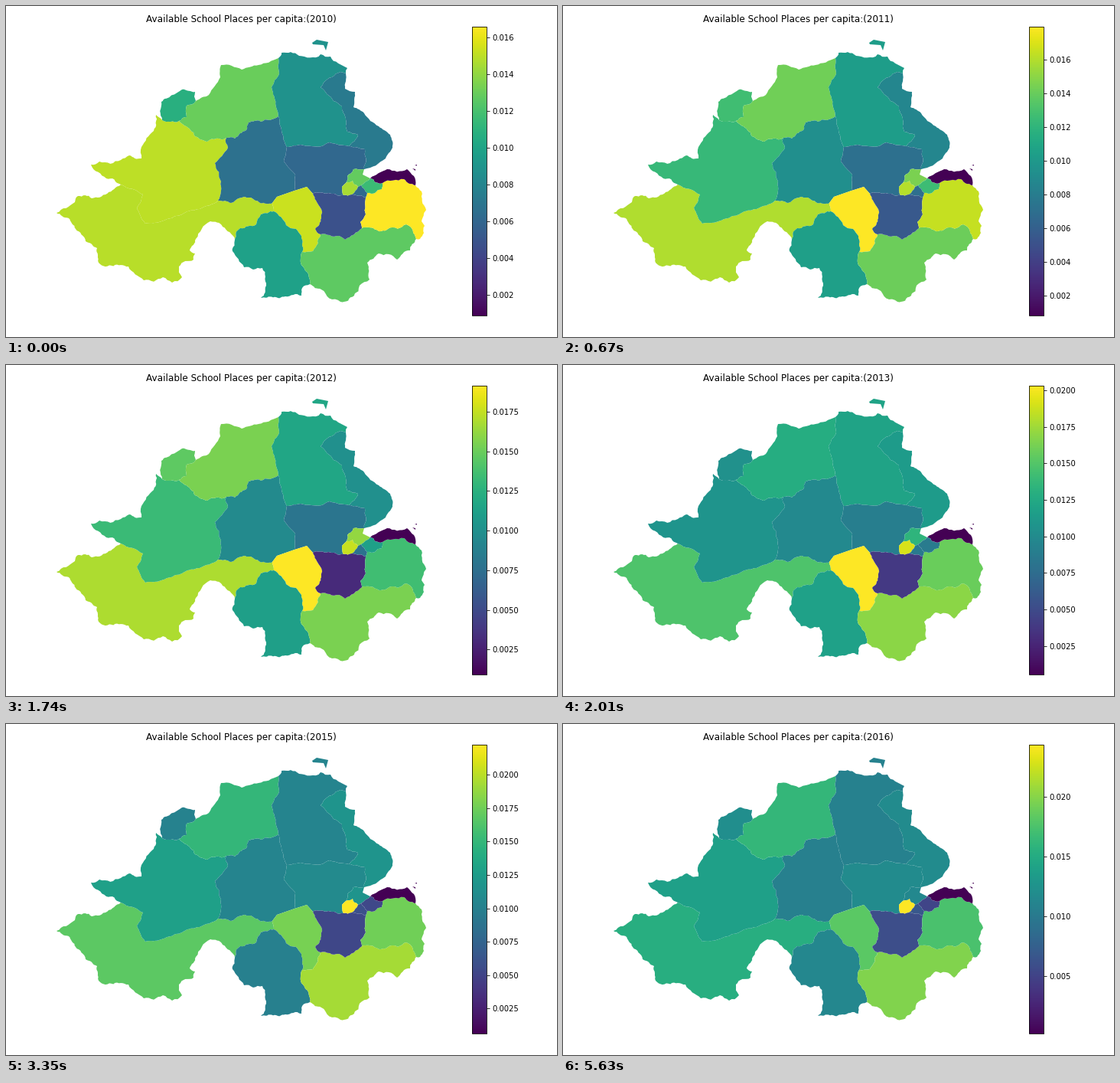
Write a matplotlib script that moves like this. It is 720 by 432 pixels and loops after 6.7 s.

```python
import numpy as np
import matplotlib.pyplot as plt
from matplotlib.animation import FuncAnimation
from matplotlib.cm import ScalarMappable
from matplotlib.colors import Normalize
from matplotlib.patches import Polygon

W, H, DPI = 720, 432, 72
FIRST_YEAR, YEARS, FRAMES = 2010, 7, 10
plt.rcParams["font.family"] = "DejaVu Sans"
rng = np.random.default_rng(4)
arcs = {}


def ragged(a, b, rough):
    """Points from a up to b, displaced at each midpoint until short."""
    dx, dy = b - a
    if np.hypot(dx, dy) < 4:
        return [a]
    mid = (a + b) / 2 + rng.uniform(-rough, rough) * np.array([-dy, dx])
    return ragged(a, mid, rough) + ragged(mid, b, rough)


def arc(name, *points, rough=0.15):
    """Border between two regions; Z is the outside."""
    keys = np.array(points, float)
    line = [p for a, b in zip(keys, keys[1:]) for p in ragged(a, b, rough)]
    arcs[name] = np.array(line + [keys[-1]])


def ring(region):
    """Chain all borders of a region into one closed outline."""
    parts = [line for name, line in arcs.items() if region in name]
    outline = parts.pop(0)
    while parts:
        tail = outline[-1]
        i = next(i for i, p in enumerate(parts)
                 if np.allclose(p[0], tail) or np.allclose(p[-1], tail))
        part = parts.pop(i)
        if np.allclose(part[-1], tail):
            part = part[::-1]
        outline = np.vstack([outline, part[1:]])
    return outline


# Outer border, clockwise
arc("EZ", (356, 68), (360, 61), (383, 65), (411, 63), (424, 66), (446, 81),
    (444, 88))
arc("FZ", (444, 88), (443, 108), (456, 112), (454, 132), (468, 140),
    (487, 157), (502, 168), (505, 185), (496, 199), (468, 213), rough=.1)
arc("OZ", (468, 213), (466, 220), (476, 225), rough=0)
arc("NZ", (476, 225), (498, 213), (524, 213), (533, 222), (535, 234))
arc("MZ", (535, 234), (543, 242), (549, 266), (543, 281), (547, 287),
    (541, 304), (536, 304))
arc("KZ", (536, 304), (528, 319), (511, 331), (487, 323), (472, 335),
    (475, 357), (455, 378), (437, 386), (412, 370), (397, 363))
arc("JZ", (397, 363), (387, 368), (386, 378), (365, 379), (333, 381),
    (340, 365), (335, 342), (311, 341), (296, 320), (299, 305))
arc("AZ", (299, 305), (283, 288), (267, 281), (248, 304), (240, 319),
    (247, 323), (245, 331), (226, 340), (230, 354), (217, 361), (205, 354),
    (180, 358), (160, 340), (121, 335), (119, 316), (104, 307), (91, 291),
    (66, 270), (90, 256), (94, 248), (112, 251), (150, 233))
arc("BZ", (150, 233), (131, 225), (111, 207), (122, 203), (150, 201),
    (161, 195), (177, 199), (177, 184), (193, 163), (196, 142), (204, 149))
arc("CZ", (204, 149), (203, 125), (230, 109), (247, 112), (248, 124))
arc("DZ", (248, 124), (265, 116), (280, 93), (281, 77), (308, 83),
    (330, 77), (356, 68), rough=.08)

# Inner borders
arc("CD", (248, 124), (236, 130), (236, 145), (226, 150))
arc("BC", (204, 149), (226, 150))
arc("BD", (226, 150), (241, 162), (247, 170), (263, 177), (288, 172))
arc("DG", (288, 172), (299, 173), (314, 162), (317, 152), (333, 151),
    (356, 144))
arc("DE", (356, 68), (357, 88), (347, 106), (356, 144), rough=.08)
arc("EG", (356, 144), (367, 184), rough=.08)
arc("BG", (277, 254), (281, 229), (273, 205), (290, 185), (288, 172))
arc("AB", (150, 233), (179, 246), (171, 263), (182, 284), (222, 274),
    (253, 265), (277, 254), rough=.08)
arc("AG", (277, 254), (294, 257), (318, 250), (348, 257))
arc("AI", (348, 257), (350, 268))
arc("AJ", (350, 268), (333, 272), (327, 285), (306, 290), (299, 305))
arc("GI", (348, 257), (354, 249), (377, 241), rough=0)
arc("GH", (367, 184), (363, 203), (378, 220), (377, 241), rough=.05)
arc("EH", (367, 184), (385, 181), (415, 182), (423, 178), (448, 183),
    rough=.08)
arc("EF", (444, 88), (437, 86), (415, 100), (411, 106), (428, 124),
    (439, 131), (444, 148), (446, 164), (460, 168), (448, 183), rough=.1)
arc("FH", (448, 183), (469, 187), (468, 213))
arc("HI", (377, 241), (393, 236), (401, 245), rough=0)
arc("HL", (401, 245), (421, 244), (441, 247))
arc("HP", (441, 247), (439, 236), (444, 231))
arc("HO", (444, 231), (446, 222), (454, 213), (468, 213))
arc("OP", (444, 231), (453, 228), (460, 236))
arc("PR", (460, 236), (452, 246))
arc("OR", (460, 236), (464, 234))
arc("OQ", (464, 234), (476, 225))
arc("QR", (464, 234), (472, 244))
arc("NQ", (476, 225), (492, 231))
arc("MQ", (472, 244), (491, 239), (492, 231))
arc("MN", (492, 231), (520, 226), (535, 234))
arc("MR", (472, 244), (470, 250))
arc("LP", (441, 247), (452, 246))
arc("LR", (452, 246), (470, 250))
arc("LM", (470, 250), (470, 272), (463, 282), (465, 290))
arc("KM", (465, 290), (499, 291), (523, 285), (536, 304))
arc("KL", (465, 290), (443, 305), (435, 300), (411, 298))
arc("IL", (401, 245), (410, 262), (412, 277), (404, 291), (411, 298))
arc("IK", (411, 298), (401, 320), (387, 321))
arc("IJ", (387, 321), (386, 300), (379, 291), (366, 286), (350, 268))
arc("JK", (387, 321), (388, 340), (397, 363))

ISLANDS = [
    ("E", [(400, 48), (406, 44), (421, 47), (418, 58), (415, 51), (401, 50)]),
    ("N", [(531, 212), (535, 213), (535, 215)]),
    ("N", [(534, 208), (537, 207), (537, 208.5)]),
]


def places(start, growth, jumps={}):
    """Places per thousand people: steady growth plus lasting jumps."""
    return [start + growth * year
            + sum(jump for when, jump in jumps.items() if when <= year)
            for year in range(YEARS)]


RATES = {
    "A": places(14.9, 1, {3: -3.1, 6: -2.4}),
    "B": places(15, 1, {1: -3.7, 3: -3.5}),
    "C": places(10.8, 1.9, {3: -6, 5: -4.2}),
    "D": places(13, 1.25, {3: -4, 4: .7, 5: -1}),
    "E": places(8.8, .3, {1: 1.2, 2: 1.1, 4: -2.2}),
    "F": places(7.3, 1.35, {5: -2.2, 6: -1.4}),
    "G": places(6.7, .27, {1: 2.3}),
    "H": places(6.1, .95),
    "I": places(15.3, 1.17, {1: 1.5, 5: -4.8, 6: -.8}),
    "J": places(9.8, .65, {5: -3.1, 6: .8}),
    "K": places(12.7, 1.4, {4: .5, 5: -.9, 6: -.9}),
    "L": places(4.8, .7, {2: -3.1}),
    "M": places(16.58, .9, {1: -1, 2: -3.8, 3: 1.3, 6: -1}),
    "N": places(.88, -.08, {2: .2, 3: -.3, 4: .25, 6: -.4}),
    "O": places(12.8, 1.7, {3: -4.5, 5: -5, 6: -2}),
    "P": places(14.5, 1.55, {6: .6}),
    "Q": places(11.6, -.2, {1: 1.2, 2: -1.2, 3: -2.3, 5: -3}),
    "R": places(6.2, .8, {5: -4.3}),
}

fig = plt.figure(figsize=(W / DPI, H / DPI), dpi=DPI, facecolor="white")
ax = fig.add_axes([0, 0, 1, 1])
ax.set(xlim=(0, W), ylim=(H, 0))
ax.axis("off")
title = ax.text(307.6, 21, "", fontsize=12, ha="center", va="baseline")

shapes = [(region, ring(region)) for region in RATES] + ISLANDS
patches = [(region, ax.add_patch(Polygon(outline, lw=0)))
           for region, outline in shapes]

scale = ScalarMappable(Normalize(0, 1), "viridis")
cax = fig.add_axes([609.1 / W, (H - 404) / H, 18.85 / W, 377 / H])
bar = fig.colorbar(scale, cax=cax)


def draw(frame):
    year = min(frame, YEARS - 1)
    title.set_text(
        f"Available School Places per capita:({FIRST_YEAR + year})")
    rates = {region: values[year] / 1000 for region, values in RATES.items()}
    scale.set_clim(min(rates.values()), max(rates.values()))
    for region, patch in patches:
        patch.set_facecolor(scale.to_rgba(rates[region]))
    return []


anim = FuncAnimation(fig, draw, frames=FRAMES, init_func=lambda: draw(0),
                     interval=670, repeat=True, repeat_delay=0)
plt.show()
```
